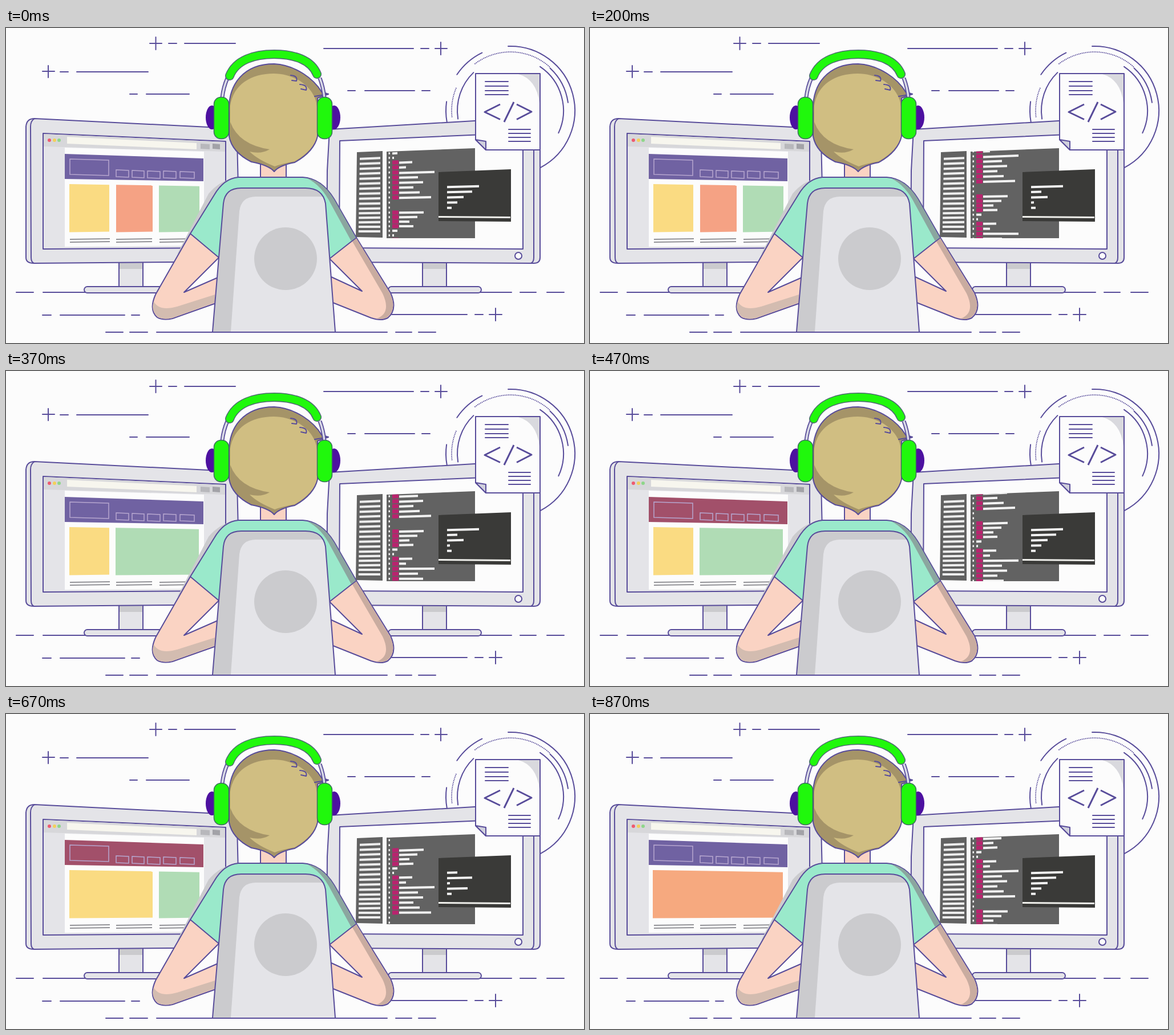
These frames come from a looping animation (1013 by 553 pixels, 0.91 s). An HTML page:

```html
<!DOCTYPE html>
<html lang="en">
<head>
<meta charset="utf-8">
<title>Developer at work</title>
<style>
html, body { margin: 0; width: 100%; height: 100%; overflow: hidden; background: #fcfcfc; }
svg { display: block; width: 100%; height: 100%; }
.ink { fill: none; stroke: #584c9a; stroke-width: 2; stroke-linejoin: round; stroke-linecap: round; }
.case { fill: #e4e4e8; }
.grey { fill: #cbcbce; }
.skin { fill: #fad3c3; }
.paper { fill: #fcfcfc; }
.lime { fill: #20f80c; }
</style>
</head>
<body>
<svg viewBox="0 0 1013 553">
  <defs>
    <clipPath id="panel"><path d="M667 217L822 211V369H667Z"/></clipPath>
    <clipPath id="chairClip"><path d="M362 533L381 308Q384 281 412 281H525Q555 281 560 308L577 533Z"/></clipPath>
  </defs>

  <!-- dashes and crosses -->
  <path class="ink" d="M252 27h21m-10.500-11v22M285 27h14M313 27h89
    M64 76h21m-11-10v21M95 77h14M124 77h125M217 116h13M246 116h75
    M557 36h157M727 36h14M752 36h21m-11-11v22M599 110h13M629 110h87M729 110h14
    M18 464h30M65 464h821M901 464h28M948 464h30
    M64 504h15M95 504h113M220 504h14M676 503h132M822 503h14M847 503h22m-11-11v22
    M175 534h30M217 534h31M264 534h404M683 534h28M723 534h30"/>
  <path class="ink" id="rings"/>
  <path class="ink" id="dots" stroke-dasharray="0 3"/>

  <!-- left monitor -->
  <path class="ink case" d="M198 410h42v45h-42Z"/>
  <path class="grey" d="M199 412h40v11h-40Z"/>
  <rect class="ink case" x="137" y="454" width="154" height="11" rx="5.500"/>
  <path class="ink case" d="M35 173Q36 159 50 159L395 176Q405 180 405 195L410 410L49 413Q35 413 35 403Z"/>
  <path class="ink" d="M50 159Q43 163 43 173L44 403Q44 411 49 413"/>
  <path class="ink case" d="M65 185L385 199V386L65 388Z"/>
  <path fill="#d7d7da" d="M66 186L384 200V217L66 208Z"/>
  <path fill="#f7f6ee" d="M107 191L334 202V213L107 203Z"/>
  <path fill="#b8b8bc" d="M341 203l16 1v9l-16-1Z"/>
  <path fill="#a2a2a7" d="M362 203l13 1v9l-13-1Z"/>
  <circle cx="76" cy="197" r="3" fill="#ee5a70"/>
  <circle cx="85" cy="197" r="3" fill="#f3d05a"/>
  <circle cx="93" cy="197" r="3" fill="#8ed68a"/>
  <path class="paper" d="M103 210L347 217V382L103 384Z"/>
  <path id="header" d="M103 221L346 229V269L103 265Z"/>
  <path fill="none" stroke="#b6a6cf" stroke-width="1.500" d="M112 230l68 2v27l-68-2Z
    M193 249l22 1v12l-22-1ZM221 250l21 1v12l-21-1ZM248 251l22 1v12l-22-1ZM276 251l22 1v12l-22-1ZM305 252l25 1v11l-25-1Z"/>
  <g id="blocks"></g>
  <path stroke="#929297" stroke-width="2" d="M112 371l70-1M112 376l70-1M193 371l63-1M193 376l63-1M269 371l60-1M269 376l60-1"/>

  <!-- right monitor -->
  <path class="ink case" d="M730 410h42v45h-42Z"/>
  <path class="grey" d="M731 412h40v11h-40Z"/>
  <rect class="ink case" x="670" y="454" width="163" height="11" rx="5.500"/>
  <path class="ink case" d="M567 178L922 157Q936 160 936 173V403Q936 413 925 413L562 411L563 250Z"/>
  <path class="ink" d="M914 160Q925 162 925 173V403Q925 411 920 413"/>
  <path class="ink paper" d="M585 198L906 184V388L584 386Z"/>
  <circle class="ink paper" cx="898" cy="400" r="6"/>
  <path fill="#626262" d="M615 218L660 216V368L613 367ZM667 217L822 211V369H667Z"/>
  <path id="side" fill="#ededed"/>
  <g clip-path="url(#panel)">
    <path id="tags" fill="#b8246e"/>
    <path id="code" fill="#f2f2f2"/>
  </g>
  <path fill="#3a3a38" d="M758 253L885 248V340L758 339Z"/>
  <path fill="#f0f0ec" d="M758 330L884 331V334L758 333Z"/>
  <path id="term" fill="#f2f2f2"/>

  <!-- document -->
  <path class="ink paper" d="M823 80H936V214H841L823 196Z"/>
  <path fill="#d9d9de" d="M898 81H935V132Q930 90 898 81Z"/>
  <path class="ink" style="fill:#d0d0dc" d="M823 196L841 199V214Z"/>
  <path class="ink" d="M840 94h40m-40 8h40m-40 8h40m-40 7h40M881 178h38m-38 7h38m-38 7h38m-38 7h38"/>
  <path class="ink" style="stroke-width:3;stroke-linecap:butt" d="M866 134L839 147.500L866 160.500M890 130L873 165M895 134L921 147L895 160.500"/>

  <!-- arms and shirt -->
  <path class="grey" d="M400 264Q374 268 355 291L300 397L335 372L385 285Z"/>
  <path class="ink skin" d="M323 361L262 468Q250 495 265 508Q275 514 292 510L385 477V400Z"/>
  <path fill="#d3bcb0" d="M259 480Q253 496 266 507Q275 513 292 509L366 482V468L300 489Q268 498 259 480Z"/>
  <path class="ink paper" d="M373 403L312 464L385 432Z"/>
  <path class="ink skin" d="M614 368L674 465Q687 494 669 509Q658 515 640 509L555 475V400Z"/>
  <path fill="#c9aca0" d="M606 373L614 369L673 466Q686 493 668 508Q660 513 650 510Q676 500 660 466Z"/>
  <path class="ink paper" d="M567 405L624 462L555 430Z"/>
  <path class="ink" style="fill:#9ae9cb" d="M407 262H520Q553 264 575 300L614 368L567 405L550 380H390L373 403L323 361L365 293Q382 264 407 262Z"/>
  <path fill="#8ba69f" d="M528 264Q555 268 575 301L613 368L605 374L570 310Q553 276 528 264Z"/>

  <!-- chair -->
  <path class="case" d="M362 533L381 308Q384 281 412 281H525Q555 281 560 308L577 533Z"/>
  <path class="grey" clip-path="url(#chairClip)" d="M360 533V280H565V296H438Q412 296 409 322L394 533Z"/>
  <circle cx="490" cy="405" r="55" fill="#cbcbce"/>
  <path class="ink" d="M362 533L381 308Q384 281 412 281H525Q555 281 560 308L577 533"/>

  <!-- head -->
  <path class="ink skin" d="M446 238V262H491V238"/>
  <ellipse cx="361" cy="157" rx="11" ry="21" fill="#4d11a0"/>
  <ellipse cx="575" cy="157" rx="11" ry="21" fill="#4d11a0"/>
  <path class="ink" style="fill:#a59468" d="M391 150C388 97 418 63 470 63C508 65 540 90 553 112L565 116L546 123V190Q540 217 506 236Q479 241 470 252Q461 241 430 235Q396 218 391 190Z"/>
  <path fill="#d0be82" d="M393 137C398 99 430 80 469 80C510 80 543 108 545 138V190Q539 215 506 234Q484 238 471 243Q441 231 427 217Q447 222 462 213Q408 205 393 165Z"/>
  <path class="ink" d="M499 83Q512 84 509 93L501 92M515 99Q529 100 526 109L517 107M541 120L565 116"/>

  <!-- headphones -->
  <g fill="none">
    <path stroke="#584c9a" stroke-width="7" d="M388 88Q381 104 379 122M550 88Q556 104 558 122"/>
    <path stroke="#d9d9e6" stroke-width="3.500" d="M388 88Q381 104 379 122M550 88Q556 104 558 122"/>
    <g stroke-linecap="round">
      <path stroke="#4d6a72" stroke-width="16" d="M392 84C403 56 435 46 470 46C505 46 535 56 545 81"/>
      <path stroke="#20f80c" stroke-width="13" d="M392 84C403 56 435 46 470 46C505 46 535 56 545 81"/>
    </g>
  </g>
  <g stroke="#3c6a60" stroke-width="1.500">
    <rect class="lime" x="364.500" y="121.500" width="26" height="73" rx="12"/>
    <rect class="lime" x="545.500" y="121.500" width="26" height="73" rx="12"/>
  </g>
</svg>
<script>
const LOOP = 910, STEP = 33.7, CYCLE = 136;
const $ = id => document.getElementById(id);
const draw = (id, d) => $(id).setAttribute('d', d);

// right end of each code line; 0 leaves only the gutter dot
const ends = [712, 701, 751, 722, 731, 714, 725, 745, 0, 0, 732, 721, 707, 714, 686, 680];
const terms = {
  a: [829, 817, 802, 791, 781],
  b: [829, 791, 802, 778, 781],
  c: [791, 817, 778, 809, 781]
};
const yellow = '#fadb82', red = '#f5a284', green = '#b0dcb5', orange = '#f6a97f';
const layouts = [
  [[111, 181, yellow], [193, 257, red], [268, 339, green]],
  [[111, 181, yellow], [192, 338, green]],
  [[111, 257, yellow], [268, 339, green]],
  [[110, 338, orange]]
];

// arc around the document, angles in degrees
function arc(r, from, to) {
  const at = deg => {
    const a = deg * Math.PI / 180;
    return `${884 + r * Math.cos(a)} ${145 + r * Math.sin(a)}`;
  };
  return `M${at(from)}A${r} ${r} 0 0 1 ${at(to)}`;
}

// offset of a text row; rows get closer lower down
const rowY = i => i < 10 ? 8.8 * i : 8 + 8 * i;

// bar centred on y, tilted by the perspective of the screen
function bar(x0, x1, y, h) {
  const w = x1 - x0, rise = w * (y - 369) * .00027;
  return `M${x0} ${y - (h + rise) / 2}l${w} ${rise}v${h}l${-w} ${-rise}z`;
}

function drawCode(shift) {
  let code = '', tags = '';
  for (let copy = 0; copy < 3; copy++) {
    ends.forEach((end, i) => {
      const y = 236 + (copy - 1) * CYCLE - shift + rowY(i);
      if (y < 205 || y > 375) return;
      code += bar(670.5, 673, y, 3.5);
      if (!end) return;
      if (i < 14) tags += bar(677, 688, y, 7);
      code += bar(i < 14 ? 689 : 677, end, y, 4);
    });
  }
  draw('code', code);
  draw('tags', tags);
}

function drawBlocks(list) {
  const top = x => 274 + (x - 110) * .016;
  $('blocks').innerHTML = list.map(([x0, x1, fill]) =>
    `<path fill="${fill}" d="M${x0} ${top(x0)}L${x1} ${top(x1)}V357.5L${x0} 358.5Z"/>`).join('');
}

draw('rings', arc(113, -92, 62) + arc(113, 214, 244) + arc(113, 170, 188) +
  arc(102, -47, -8) + arc(93, 171, 226) + arc(93, -56, 25));
draw('dots', arc(103, 233, 312) + arc(103, 174, 203));

let side = '';
for (let i = 0; i < 16; i++) side += bar(620 - i * .15, 656, 229 + rowY(i), 4);
draw('side', side);

let last = -1;
function tick(now) {
  const t = now % LOOP, n = Math.min(26, Math.floor((t + 8) / STEP));
  if (n !== last) {
    last = n;
    const pause = 2 * Math.min(1, Math.max(0, (n - 6) / 5));
    drawCode(4.72 * (n - pause));
    drawBlocks(layouts[t < 300 ? 0 : t < 570 ? 1 : t < 730 ? 2 : 3]);
    $('header').setAttribute('fill', t >= 430 && t < 730 ? '#a2506a' : '#7062a2');
    const term = t >= 130 && t < 430 ? 'b' : t >= 570 && t < 830 ? 'c' : 'a';
    draw('term', terms[term].map((x, i) => bar(773, x, 278.5 + i * 9.3, 4)).join(''));
  }
  requestAnimationFrame(tick);
}
tick(performance.now());
</script>
</body>
</html>
```
